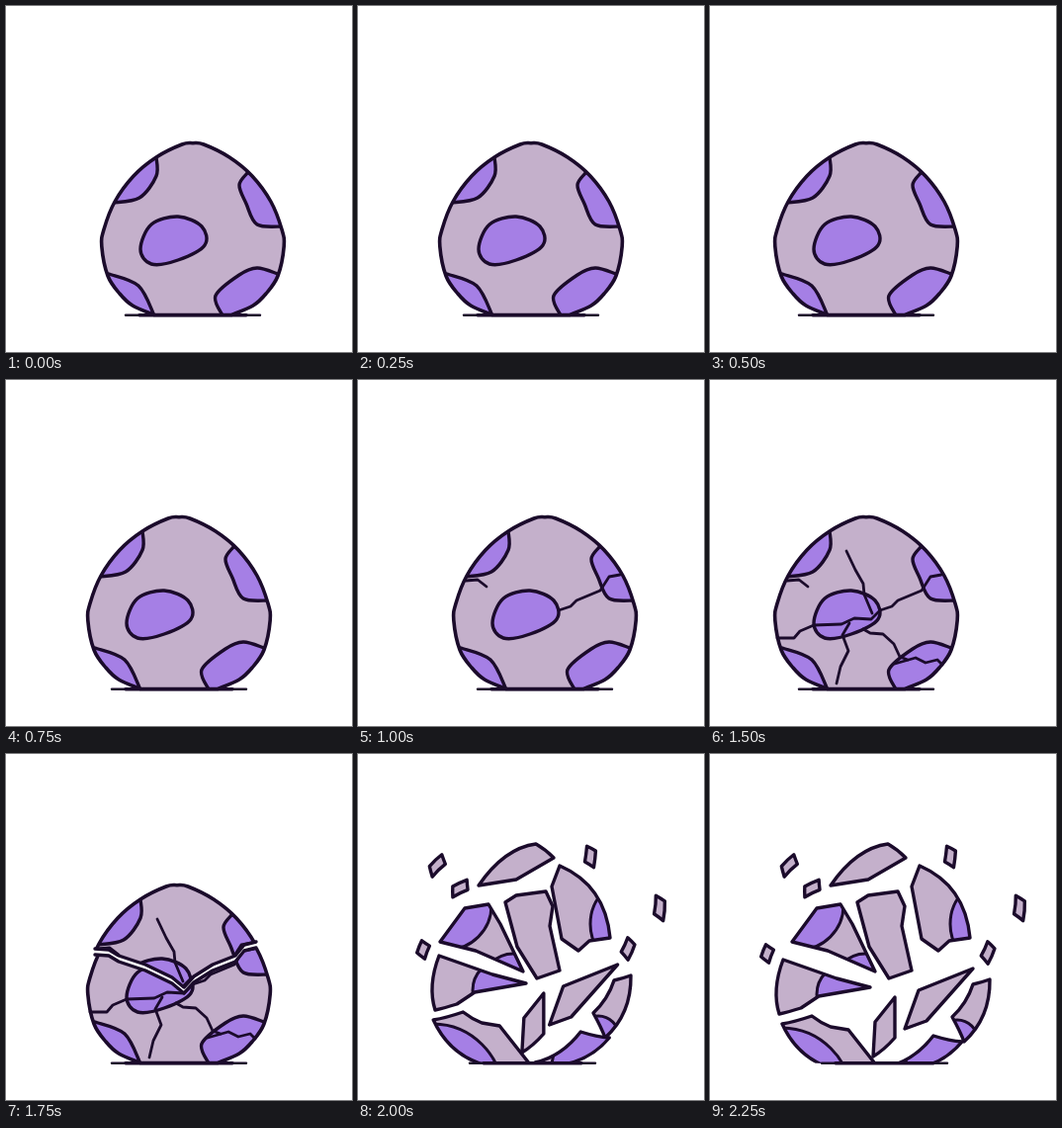
An HTML page with a canvas for the animation above (3250 ms loop, 350 by 350 pixels).

```html
<!DOCTYPE html>
<html lang="en">
<head>
<meta charset="utf-8">
<title>Hatching egg</title>
<style>
html, body { margin: 0; width: 100%; height: 100%; overflow: hidden; background: #fff; }
canvas { display: block; width: 350px; height: 350px; }
</style>
</head>
<body>
<canvas id="stage" width="350" height="350"></canvas>
<script>
const ctx = document.getElementById('stage').getContext('2d');
const INK = '#1b0b2b', SHELL = '#c4b0cb', SPOT = '#a57fe5';
const LOOP = 3250, STEP = 250, LAST = 9;
const FLOOR = 312.7, CENTER = [168, 205], RIM = 83;
const SWAY = [14, 0, -17, 0];

// "x,y x,y" -> list of points
const pts = s => s.split(' ').map(p => p.split(',').map(Number));

function poly(points) {
  const path = new Path2D();
  points.forEach(p => path.lineTo(...p));
  return path;
}

// Smooth curve through every point
function curve(p, closed) {
  const n = p.length, path = new Path2D();
  const at = i => closed ? p[(i + n) % n] : p[Math.max(0, Math.min(n - 1, i))];
  path.moveTo(...p[0]);
  for (let i = 0; i < (closed ? n : n - 1); i++) {
    const [a, b, c, d] = [at(i - 1), at(i), at(i + 1), at(i + 2)];
    path.bezierCurveTo(b[0] + (c[0] - a[0]) / 6, b[1] + (c[1] - a[1]) / 6,
      c[0] - (d[0] - b[0]) / 6, c[1] - (d[1] - b[1]) / 6, c[0], c[1]);
  }
  return path;
}

function ink(path, width = 3.4) {
  ctx.lineWidth = width;
  ctx.strokeStyle = INK;
  ctx.stroke(path);
}

function fill(path, color) {
  ctx.fillStyle = color;
  ctx.fill(path);
}

// Runs paint, then restores the canvas state
function scoped(paint) {
  ctx.save();
  paint();
  ctx.restore();
}

// The shell is one half profile, mirrored about x = 175
const profile = pts('0,138.7 11,140 37,153 60,172 79,198 90,226 92.2,243 86,273 74,291 61,303 39,312.5');
const egg = curve([
  ...profile.slice(1).reverse().map(([w, y]) => [175 - w, y]),
  ...profile.map(([w, y]) => [175 + w, y])
]);
egg.closePath();

// The last point closes each spot outside the shell
const spots = [
  '138,153 138,172 121,194 94,199 60,150',
  '231,168 222,181 229,200 240,221 266,223 290,170',
  '90,271 120,283 136,313 60,320',
  '205,313 198,293 222,272 240,265 261,271 290,325'
].map(s => {
  const p = pts(s), corner = p.pop(), line = curve(p), area = new Path2D(line);
  area.lineTo(...corner);
  return { line, area };
});
const middle = curve(pts('122,246 133,221 160,213 184,223 187,242 160,257 133,261'), true);

const cracks = [
  [4, '189,233 201,229 207,223 231,213 240,199 251,197'],
  [4, '95,203 107,202 116,209'],
  [5, '85,261 102,261 108,254 122,248 150,247 163,241 180,242 189,233'],
  [5, '204,287 225,281 235,286 247,283 252,288'],
  [6, '155,173 164,192 172,206 173,217 181,236'],
  [6, '158,246 151,258 157,274 149,290 145,307'],
  [6, '172,252 179,256 192,257 203,267 209,280 217,283']
].map(([from, s]) => ({ from, path: poly(pts(s)) }));

const split = pts('90,200 104,201 114,207 141,216 168,229 180,239 190,228 209,216 232,207 241,196 253,193');

function drawEgg(stage) {
  fill(egg, SHELL);
  scoped(() => {
    ctx.clip(egg);
    for (const { line, area } of spots) {
      fill(area, SPOT);
      ink(line);
    }
  });
  fill(middle, SPOT);
  ink(middle);
  cracks.forEach(c => { if (stage >= c.from) ink(c.path, 2.8); });
  ink(egg, 3.6);
}

function ground(x0, x1) {
  ink(poly([[x0, FLOOR], [x1, FLOOR]]), 2.4);
  ink(poly([[x0 + 14, FLOOR], [x1 - 14, FLOOR]]), 3.6);
}

// One side of the split: side -1 is the lid, 1 the bowl
function drawHalf(side, dx, dy) {
  const edge = split.map(([x, y]) => [x, y + side * 3]);
  const far = side < 0 ? 0 : 350;
  scoped(() => {
    ctx.clip(poly([[0, far], [0, edge[0][1]], ...edge, [350, edge[10][1]], [350, far]]));
    ctx.translate(dx, dy);
    drawEgg(7);
  });
  ink(poly(edge));
}

// Straight edges, except that those along the rim bow outwards
function shardPath(p) {
  const path = new Path2D();
  path.moveTo(...p[0]);
  p.forEach(([ax, ay], i) => {
    const [bx, by] = p[(i + 1) % p.length];
    const out = (x, y) => Math.hypot(x - CENTER[0], y - CENTER[1]);
    const mx = (ax + bx) / 2, my = (ay + by) / 2;
    const onRim = out(ax, ay) > RIM && out(bx, by) > RIM;
    const bow = onRim ? Math.hypot(bx - ax, by - ay) ** 2 / 300 / out(mx, my) : 0;
    path.quadraticCurveTo(mx + (mx - CENTER[0]) * bow, my + (my - CENTER[1]) * bow, bx, by);
  });
  path.closePath();
  return path;
}

// Pieces fly sideways, slower near the floor; the upper left ones hang still
function driftOf(p) {
  const [x, y] = [0, 1].map(k => p.reduce((sum, q) => sum + q[k], 0) / p.length);
  if (x < 190 && y < 190) return [0, 0];
  const dx = (x - 190) * (320 - y) / 680;
  return [Math.max(-8, Math.min(8, dx)), y > 190 ? 4 : 0];
}

// A chip: slanted kite around x, y
function chip(x, y, size, tilt) {
  const c = Math.cos(tilt), s = Math.sin(tilt), w = 6;
  return [[-0.4 * w, -size], [w, -size / 2], [0.4 * w, size], [-w, size * 0.4]]
    .map(([u, v]) => [x + u * c - v * s, y + u * s + v * c]);
}

function circle(x, y, r) {
  const path = new Path2D();
  path.arc(x, y, r, 0, 7);
  return path;
}

const shard = (p, ...rounds) => ({
  path: shardPath(p), drift: driftOf(p), marks: rounds.map(r => circle(...r))
});

const shards = [
  shard(pts('122,133 180,91 198,105 160,127')),
  shard(pts('83,190 108,156 132,152 144,172 167,220 119,199'), [90, 153, 45], [157, 233, 31]),
  shard(pts('149,150 160,143 190,139 197,154 194,174 204,219 181,227 161,195')),
  shard(pts('212,113 263,186 242,189 231,199 214,187 204,134'), [290, 172, 47]),
  shard(pts('74,208 128,227 162,236 110,245 92,257 70,263'), [139, 243, 31]),
  shard(pts('266,217 211,239 197,278 219,270')),
  shard(pts('187,246 167,271 165,306 187,287')),
  shard(pts('283,228 266,233 245,266 257,291'), [250, 290, 21]),
  shard(pts('73,273 103,265 122,276 140,279 170,317 120,317'), [72, 348, 71]),
  shard(pts('180,316 226,285 255,291 214,317'), [235, 322, 38.5]),
  shard(chip(80, 113, 12, 0.6)),
  shard(chip(103, 136, 11, 0.9)),
  shard(chip(243, 104, 11, -0.1)),
  shard(chip(313, 156, 13, -0.1)),
  shard(chip(281, 201, 11, 0.2)),
  shard(chip(58, 202, 9, 0.1))
];

// back is how far the pieces still are from their final place
function drawShards(back) {
  scoped(() => {
    ctx.beginPath();
    ctx.rect(0, 0, 350, FLOOR);
    ctx.clip();
    for (const { path, drift, marks } of shards) {
      scoped(() => {
        ctx.translate(-drift[0] * back, -drift[1] * back);
        fill(path, SHELL);
        scoped(() => {
          ctx.clip(path);
          marks.forEach(m => { fill(m, SPOT); ink(m, 3); });
        });
        ink(path);
      });
    }
  });
  ground(113, 240);
}

function draw(ms) {
  const stage = Math.min(LAST, Math.floor((ms % LOOP) / STEP));
  ctx.fillStyle = '#fff';
  ctx.fillRect(0, 0, 350, 350);
  if (stage < 7) {
    scoped(() => {
      ctx.translate(SWAY[stage % 4], 0);
      drawEgg(stage);
      ground(107, 243);
    });
  } else if (stage === 7) {
    drawHalf(1, 0, 0);
    drawHalf(-1, -2, -6);
    ground(107, 243);
  } else {
    drawShards(LAST - stage);
  }
}

ctx.lineCap = ctx.lineJoin = 'round';
const start = performance.now();
function tick() {
  draw(performance.now() - start);
  requestAnimationFrame(tick);
}
tick();
</script>
</body>
</html>
```
